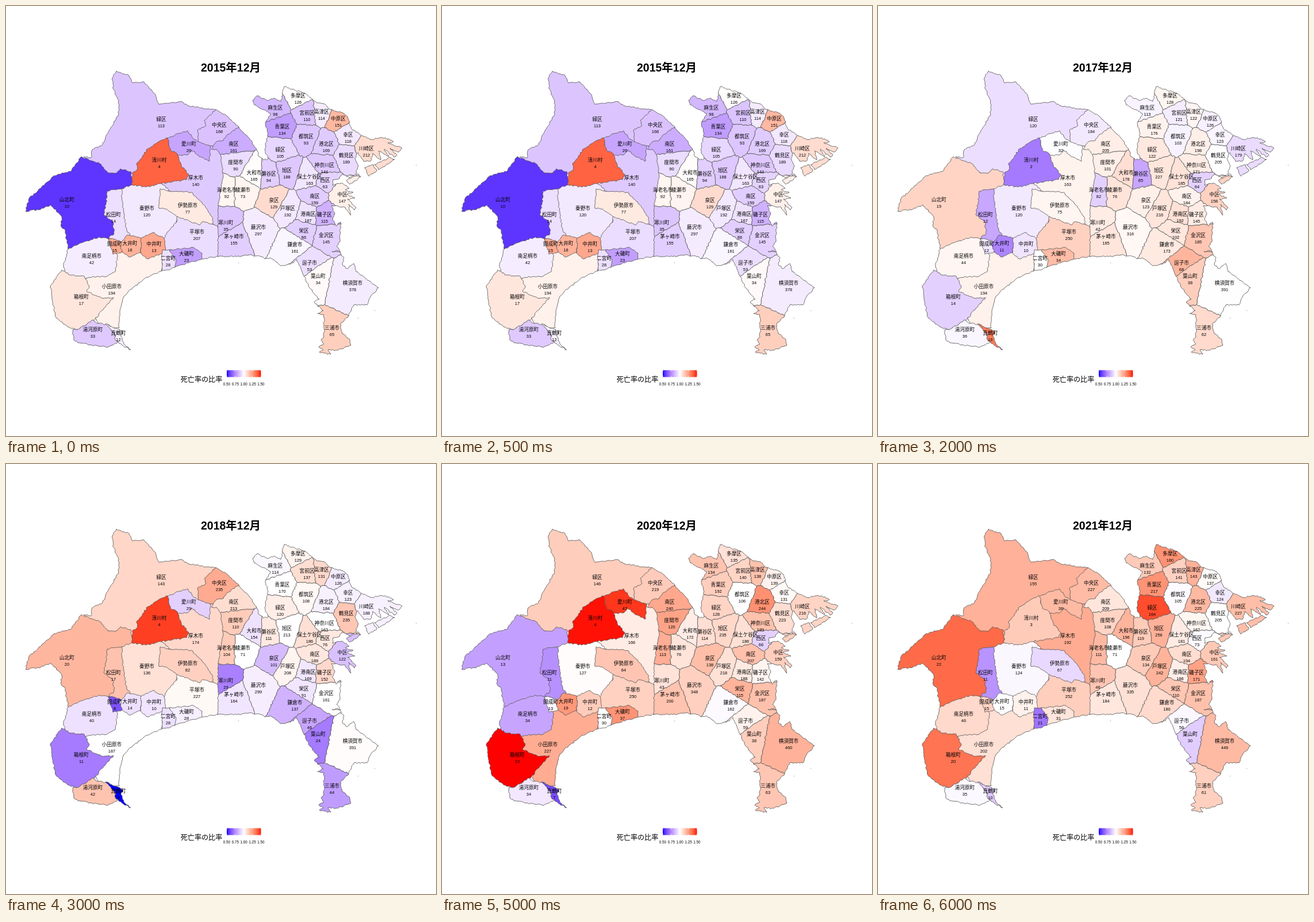
Recreate the animation shown at these times as an HTML page. Size 748 by 748 pixels, loop 7000 ms.

```html
<!DOCTYPE html>
<html lang="ja">
<head>
<meta charset="utf-8">
<style>
html, body { margin: 0; width: 100%; height: 100%; overflow: hidden; background: #fff; }
svg { display: block; width: 100vw; height: 100vh; }
path { stroke: #595959; stroke-width: .85; stroke-linejoin: round; }
text { text-anchor: middle; fill: #000; font-family: "Liberation Sans", "Noto Sans CJK JP", "Noto Sans CJK", sans-serif; }
.name { font-size: 8.6px; }
.count { font-size: 7.5px; }
.title { font-size: 19.5px; font-weight: bold; }
.key { font-size: 12.1px; font-weight: 300; }
.tick { font-size: 6.3px; }
</style>
</head>
<body>
<svg id="map" viewBox="0 0 748 748" xmlns="http://www.w3.org/2000/svg"></svg>
<script>
const NS = "http://www.w3.org/2000/svg";
const YEAR_MS = 1000, YEARS = 7, FIRST = 2015;
const svg = document.getElementById("map");

function add(tag, attrs, text, parent = svg) {
  const el = document.createElementNS(NS, tag);
  for (const k in attrs) el.setAttribute(k, attrs[k]);
  if (text) el.textContent = text;
  parent.appendChild(el);
  return el;
}

// Diverging blue-white-red scale, blended in CIE Lab
function color(ratio) {
  const t = Math.max(-1, Math.min(1, (ratio - 1) * 2)), s = Math.abs(t);
  const [l, a, b] = t < 0 ? [32.3, 79.2, -107.9] : [53.2, 80.1, 67.2];
  const fy = (100 + (l - 100) * s + 16) / 116;
  const lin = f => f > .2069 ? f ** 3 : (f - .13793) / 7.787;
  const x = .9505 * lin(fy + a * s / 500), y = lin(fy), z = 1.089 * lin(fy - b * s / 200);
  const rgb = [
    3.2406 * x - 1.5372 * y - .4986 * z,
    -.9689 * x + 1.8758 * y + .0415 * z,
    .0557 * x - .204 * y + 1.057 * z
  ].map(c => {
    c = Math.max(0, Math.min(1, c));
    return Math.round(255 * (c > .0031 ? 1.055 * c ** (1 / 2.4) - .055 : 12.92 * c));
  });
  return `rgb(${rgb})`;
}

const parse = s => s.split(" ").map(p => p.split(",").map(Number));
const noise = n => (Math.sin(n) * 43758.5453 % 1 + 1) % 1 - .5;

// Natural wiggle along an edge; the same edge gives the same line from both sides
function edge(a, b) {
  const flip = a[0] > b[0] || (a[0] === b[0] && a[1] > b[1]);
  const [[x, y], [u, v]] = flip ? [b, a] : [a, b];
  const len = Math.hypot(u - x, v - y), n = Math.max(1, Math.round(len / 3));
  const pts = [];
  for (let k = 0; k <= n; k++) {
    const f = k / n, off = k % n ? 2.4 * noise(x * 12.9 + y * 78.2 + u * 3.7 + v + k) / len : 0;
    pts.push([x + (u - x) * f - (v - y) * off, y + (v - y) * f + (u - x) * off]);
  }
  return (flip ? pts.reverse() : pts).slice(0, -1);
}

const outline = pts => "M" + pts.flatMap((p, i) => edge(p, pts[(i + 1) % pts.length]))
  .map(p => p.map(c => c.toFixed(1)).join(" ")).join("L") + "Z";

// Keeps the part of a polygon nearer to site a than to site b
function nearer(poly, a, b) {
  const dx = b.x - a.x, dy = b.y - a.y;
  const limit = (b.x ** 2 + b.y ** 2 - b.pull - a.x ** 2 - a.y ** 2 + a.pull) / 2;
  const side = p => p[0] * dx + p[1] * dy - limit;
  return poly.flatMap((p, i) => {
    const q = poly[(i + 1) % poly.length], s = side(p), t = side(q), f = s / (s - t);
    const cut = s * t < 0 ? [[p[0] + (q[0] - p[0]) * f, p[1] + (q[1] - p[1]) * f]] : [];
    return s <= 0 ? [p, ...cut] : cut;
  });
}

// Yearly population change in %, and extra reach of a cell
const GROWTH = { 清川村: -1.5, 山北町: -1.5, 真鶴町: -1.5, 箱根町: -1.2, 三浦市: -1, 松田町: -.8,
  湯河原町: -.8, 南足柄市: -.7, 横須賀市: -.6, 開成町: 1.5, 海老名市: .8, 中原区: 1, 西区: 1, 幸区: .8 };
const PULL = { 横須賀市: 1200, 三浦市: -800 };

const areas = [];
function area(name, x, y, counts, shape) {
  const deaths = counts.split(" ").map(Number);
  const rates = deaths.map((d, i) => d / (1 + (GROWTH[name] || 0) / 100) ** (i - 2));
  const mean = rates.slice(0, 5).reduce((a, b) => a + b) / 5;
  areas.push({ name, x, y, deaths, shape, pull: PULL[name] || 0, fills: rates.map(r => color(r / mean)) });
}

// West: drawn in order, later areas cover the edges of earlier ones
area("緑区", 270, 197, "113 118 120 143 151 146 155", "135,262 148,264 150,250 168,241 179,217 196,188 196,165 187,145 185,125 192,113 214,121 220,134 240,132 258,152 266,171 303,166 319,174 350,179 365,180 365,232 290,245 245,300 200,300 155,280");
area("山北町", 106, 337, "10 15 19 20 21 13 22", "131,262 163,274 177,290 193,290 199,283 217,288 222,325 195,400 150,415 108,423 102,388 96,384 97,366 78,346 60,354 34,357 40,335 62,315 84,295 112,288");
area("厚木市", 330, 299, "140 158 163 174 155 166 192", "350,238 380,255 376,390 362,390 320,340 265,312 295,255");
area("秦野市", 245, 352, "120 131 120 136 123 127 124", "201,318 219,311 256,300 267,306 281,317 300,365 290,390 275,412 200,410 195,340");
area("中央区", 371, 207, "168 193 184 235 185 219 227", "365,180 385,192 405,210 408,222 370,245 335,240 333,216 348,208 345,199");
area("愛川町", 318, 240, "26 35 32 29 39 47 38", "281,231 300,222 316,217 327,232 348,242 356,244 354,270 336,262 323,250 316,259 285,260");
area("清川村", 266.5, 268, "4 1 2 4 3 4 3", "281,229 286,251 298,257 305,278 318,293 314,302 268,309 243,315 219,311 220,290 229,284 227,276 247,248 264,237");
area("平塚市", 332, 393, "207 204 250 227 228 250 252", "298,366 297,376 280,394 270,415 274,429 341,440 369,436 376,390 361,380 310,360");
area("伊勢原市", 316, 346.5, "77 72 75 82 59 84 67", "268,318 283,322 322,324 344,346 358,366 361,380 342,375 337,381 300,367 279,353 266,352");
area("小田原市", 184, 487.5, "194 177 194 187 183 227 202", "141,465 190,425 275,428 271,461 240,475 212,498 204,508 198,535 197,560 165,560 133,500");
area("南足柄市", 149, 435, "42 41 44 40 48 34 46", "108,423 128,413 162,402 178,405 194,433 190,462 176,470 145,472 125,478 104,470 100,450");
area("箱根町", 131, 506, "17 21 14 11 15 23 20", "97,459 112,468 136,470 145,487 140,496 166,508 187,507 170,526 155,545 125,563 107,558 86,540 77,487");
area("湯河原町", 151, 563, "33 27 36 42 45 34 35", "116,563 128,561 152,546 158,552 180,555 195,585 176,594 125,586 118,581");
area("真鶴町", 195.5, 569, "12 10 16 5 17 7 10", "173,553 195,562 203,567 200,575 205,588 217,598 202,590 190,580 190,572");
area("松田町", 187, 363, "14 18 12 17 13 11 11", "176,322 201,318 203,344 204,355 210,390 216,398 208,415 179,403 188,396 186,376 170,362 174,345");
area("開成町", 189, 413.5, "15 17 12 8 11 13 15", "178,404 199,409 202,428 186,432");
area("大井町", 215.5, 412.5, "18 16 11 14 16 19 15", "197,413 212,398 236,404 234,429 215,437 202,428");
area("中井町", 257.5, 413.5, "13 10 10 10 10 12 11", "235,404 255,394 275,404 278,429 246,440 234,430");
area("大磯町", 314, 431, "23 30 34 28 30 37 31", "284,424 326,420 341,430 341,440 294,454");
area("二宮町", 282, 438.5, "28 24 30 28 40 30 21", "272,424 284,424 296,443 294,455 271,461");

// East: each area is the land nearest to its label
area("藤沢市", 439, 385, "297 305 316 299 333 348 335");
area("茅ヶ崎市", 396.5, 401, "155 164 185 164 197 200 184");
area("寒川町", 382.5, 376.5, "35 46 42 29 48 43 46");
area("南区", 396, 240, "161 194 205 213 207 240 209");
area("座間市", 399.5, 271.5, "90 92 101 110 92 120 108");
area("海老名市", 384, 320, "92 95 82 104 82 113 111");
area("綾瀬市", 412, 320, "73 75 76 71 60 76 71");
area("大和市", 431.5, 290, "165 148 178 154 175 172 196");
area("横須賀市", 603, 481.5, "378 370 391 391 420 460 449");
area("三浦市", 567, 559.5, "65 54 62 44 58 63 61");
area("鎌倉市", 502.5, 415, "161 170 173 137 179 162 180");
area("逗子市", 528, 447, "53 59 68 46 59 59 56");
area("葉山町", 543, 469.5, "34 29 38 24 43 38 30");
area("金沢区", 557, 399, "145 154 185 161 160 187 187");
area("戸塚区", 490, 352, "192 197 216 208 197 218 242");
area("栄区", 518, 391, "86 96 102 91 105 115 110");
area("泉区", 466, 338, "129 114 123 101 123 138 134");
area("保土ケ谷区", 528, 297, "163 159 185 186 167 186 181");
area("瀬谷区", 457, 291.5, "94 118 85 111 117 114 119");
area("旭区", 488.5, 285.5, "188 219 227 213 218 235 256");
area("港南区", 525.5, 361.5, "167 163 192 169 199 188 186");
area("南区", 537, 331, "159 179 184 189 179 207 194");
area("磯子区", 554, 363, "115 140 145 152 138 142 171");
area("神奈川区", 554, 277, "144 159 171 163 178 189 167");
area("西区", 555, 303, "63 78 64 76 74 66 73");
area("中区", 585, 327.5, "147 134 158 122 144 159 161");
area("緑区", 477, 250, "105 100 122 120 128 128 164");
area("港北区", 557, 240, "169 173 198 184 226 244 225");
area("都筑区", 522, 227, "93 101 103 108 125 106 105");
area("青葉区", 480.5, 209.5, "134 170 176 170 200 192 217");
area("麻生区", 468.5, 177, "98 112 113 114 143 134 132");
area("宮前区", 523.5, 186, "110 127 121 137 135 140 141");
area("多摩区", 508, 155.5, "126 112 128 129 130 135 160");
area("高津区", 549, 183.5, "114 116 122 131 112 138 143");
area("中原区", 578, 195.5, "151 127 126 126 120 139 137");
area("鶴見区", 592, 260, "189 191 205 235 205 223 205");
area("幸区", 595, 224, "118 141 123 123 125 131 124");
area("川崎区", 627, 247.5, "212 184 179 188 207 216 227");

const north = "392,219 405,211 423,230 436,250 440,262 448,268 456,266 450,250 456,222 451,204 460,187 432,172 429,164 437,156 453,164 467,160 478,166 484,140 520,152 540,168 553,170 563,180 586,186 595,195 601,213 614,222";
const bay = "634,232 660,229 674,236 664,238 689,247 683,254 668,247 680,259 675,263 658,249 666,262 648,252 652,268 638,256 634,270 622,270 612,255 607,265 613,278 608,293 597,299 585,292 580,300 569,302 568,312 584,308 597,317 590,320 604,324 592,328 607,334 594,336 609,351 606,355 596,345 600,364 590,350 566,347 572,362 568,370 574,383 582,376 581,410 575,418 582,428";
const cape = "567,427 577,425 588,438 585,449 593,457 605,448 609,462 648,490 634,506 628,520 605,520 596,539 582,553 585,570 598,580 600,590 577,599 560,598 565,606 545,602 552,598 544,593 553,588 548,581 553,575 553,537 542,535 552,530 536,515 545,510 528,490 515,462 506,441 500,447 478,452 460,438";
const west = "450,440 446,436 423,433 410,435 369,436 369,345 378,297 374,262 366,249 357,249 366,236 378,234 383,226";
const islands = [
  "624,281 639,276 645,287 631,296",
  "641,276 668,263 676,267 648,285",
  "592,304 613,292 617,297 598,310"
];
const land = [[north, bay, cape, west].join(" "), ...islands].map(s => outline(parse(s))).join("");

add("path", { d: land }, "", add("clipPath", { id: "land" }));
const plain = areas.filter(a => a.shape), sites = areas.filter(a => !a.shape);
for (const a of plain) a.path = add("path", { d: outline(parse(a.shape)) });

const cells = add("g", { "clip-path": "url(#land)" });
for (const a of sites) {
  let poly = parse("300,60 748,60 748,680 300,680");
  for (const b of sites) if (b !== a) poly = nearer(poly, a, b);
  poly = poly.map(p => p.map(c => Math.round(c * 10) / 10));
  a.path = add("path", { d: outline(poly) }, "", cells);
}
add("path", { d: land, fill: "none" });
add("path", { d: "M713 277h1M612 543h1M641 530h1M404 447h1" });

for (const a of areas) {
  add("text", { x: a.x, y: a.y + 3.2, class: "name" }, a.name);
  a.count = add("text", { x: a.x, y: a.y + 14.2, class: "count" });
}
const title = add("text", { x: 391, y: 113.5, class: "title" });

// Legend
const X0 = 384, W = 59.5;
add("text", { x: 340, y: 653.5, class: "key" }, "死亡率の比率");
const grad = add("linearGradient", { id: "scale" });
for (let i = 0; i <= 20; i++)
  add("stop", { offset: i / 20, "stop-color": color(.5 + i / 20) }, "", grad);
add("rect", { x: X0, y: 633.5, width: W, height: 12, fill: "url(#scale)" });
for (let i = 0; i < 5; i++) {
  const x = X0 + W * i / 4;
  for (const y of [633.5, 643])
    add("rect", { x: x - .4, y, width: .8, height: 2.5, fill: "#fff" });
  add("text", { x, y: 659.7, class: "tick" }, (.5 + i / 4).toFixed(2));
}

let shown = -1;
function show(i) {
  if (i === shown) return;
  shown = i;
  title.textContent = FIRST + i + "年12月";
  for (const a of areas) {
    a.path.setAttribute("fill", a.fills[i]);
    a.count.textContent = a.deaths[i];
  }
}

const start = performance.now();
function tick(now) {
  show(Math.floor(Math.max(0, now - start) / YEAR_MS) % YEARS);
  requestAnimationFrame(tick);
}
show(0);
requestAnimationFrame(tick);
</script>
</body>
</html>
```
